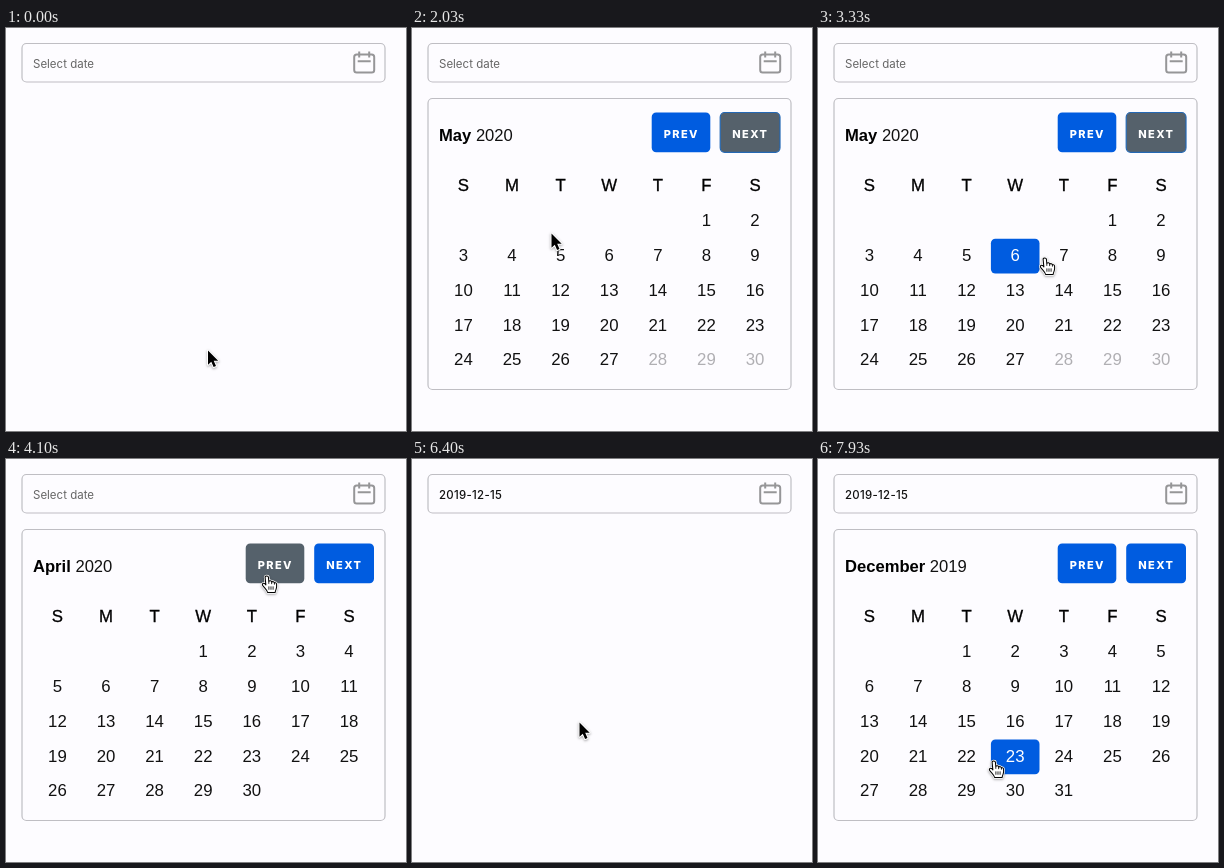
Animation, 400 px wide and 403 px high, one loop 8000 ms. Source, as an HTML page with a canvas:

```html
<!DOCTYPE html>
<html lang="en">
<head>
<meta charset="utf-8">
<title>Date picker</title>
<style>
html, body { margin: 0; width: 100%; height: 100%; overflow: hidden; background: #fdfcff; }
canvas { display: block; width: 400px; height: 403px; }
</style>
</head>
<body>
<canvas id="stage"></canvas>
<script>
const W = 400, H = 403, LOOP = 8000;
const PAGE = '#fdfcff', BLUE = '#005ce0', SLATE = '#55616b', LINE = '#bfbec3', ICON = '#969698';
const SANS = '"Liberation Sans", Arial, sans-serif';
const UI = 'Inter, Roboto, sans-serif';
const GRID = { x: 27.1, y: 176, w: 48.6, h: 34.8, rows: 5 };
const PREV = { x: 239.7, y: 84.5, w: 58.6, h: 39.8 };
const NEXT = { x: 308.2, y: 84.5, w: 59.8, h: 39.8 };
const INPUT = { x: 16, y: 15.5, w: 363, h: 38.5 };
const TODAY = 27;

// Opening, first click on PREV, repeated clicks, picking a day, reopening
const OPEN = 1260, BACK = 3950, REPEAT = 4250, BEAT = 160, PICK = 5850, REOPEN = 7170;
const HOVER_LAG = 20;

const canvas = document.getElementById('stage');
const ctx = canvas.getContext('2d');
const dpr = window.devicePixelRatio || 1;
canvas.width = W * dpr;
canvas.height = H * dpr;

const clamp = (v, lo, hi) => Math.min(hi, Math.max(lo, v));
const isOpen = t => (t >= OPEN && t < PICK) || t >= REOPEN;
const inside = (p, b) => p.x >= b.x && p.x < b.x + b.w && p.y >= b.y && p.y < b.y + b.h;
const cellAt = (col, row) => ({
  x: GRID.x + col * GRID.w, y: GRID.y + row * GRID.h, w: GRID.w, h: GRID.h
});

// The pointer's stops
const stop = (t, x, y) => ({ t, x, y });
const onCell = (t, col, row) => {
  const c = cellAt(col, row);
  return stop(t, c.x + c.w / 2, c.y + c.h / 2);
};
const ROUTE = [
  stop(400, 202, 322.5), stop(1200, 146, 37), stop(2030, 139.5, 205.5),
  onCell(2400, 5, 1), onCell(2860, 0, 1), stop(3330, 227, 230), stop(3480, 314, 208),
  stop(3730, 261, 117), stop(4900, 261, 117),
  onCell(5150, 6, 2), stop(5370, 259.5, 257), onCell(5750, 2, 2),
  stop(6400, 167.5, 263.5), stop(7100, 150, 38), stop(7470, 150, 109),
  onCell(7720, 5, 2), stop(7930, 176, 302), stop(LOOP, 170, 302)
];

// Monotone cubic through the stops, so rests stay still
function slope(i, k) {
  if (i <= 0 || i >= ROUTE.length - 1) return 0;
  const [a, b, c] = ROUTE.slice(i - 1, i + 2);
  const d = (b[k] - a[k]) / (b.t - a.t);
  const e = (c[k] - b[k]) / (c.t - b.t);
  return d * e <= 0 ? 0 : 2 * d * e / (d + e);
}

function pointerAt(time) {
  const t = Math.max(time, ROUTE[0].t);
  const i = Math.max(1, ROUTE.findIndex(s => s.t > t)) - 1;
  const a = ROUTE[i], b = ROUTE[i + 1], span = b.t - a.t;
  const u = (t - a.t) / span, v = 1 - u;
  const at = k => a[k] * (1 + 2 * u) * v * v + b[k] * u * u * (3 - 2 * u)
    + span * u * v * (v * slope(i, k) - u * slope(i + 1, k));
  return { x: at('x'), y: at('y') };
}

// Counts back from May 2020; weekdays always follow 2020 and five rows fit
function monthAt(t) {
  const back = t < BACK ? 0 : clamp(2 + Math.floor((t - REPEAT) / BEAT), 1, 5);
  const m = (16 - back) % 12;
  const first = new Date(2020, m, 1).getDay();
  const days = Math.min(new Date(2020, m + 1, 0).getDate(), GRID.rows * 7 - first);
  const name = new Date(2020, m, 1).toLocaleString('en-US', { month: 'long' });
  return { name, year: back > 4 ? 2019 : 2020, first, days, last: back ? days : TODAY, newest: !back };
}

function dayUnder(p, month) {
  const col = Math.floor((p.x - GRID.x) / GRID.w);
  const row = Math.floor((p.y - GRID.y) / GRID.h);
  if (col < 0 || col > 6 || row < 0 || row >= GRID.rows) return 0;
  const day = row * 7 + col - month.first + 1;
  return day > 0 && day <= month.last ? day : 0;
}

function box(b, fill, stroke, r = 4.5) {
  ctx.beginPath();
  ctx.roundRect(b.x, b.y, b.w, b.h, r);
  ctx.fillStyle = fill;
  ctx.fill();
  if (!stroke) return;
  ctx.strokeStyle = stroke;
  ctx.lineWidth = 1.2;
  ctx.stroke();
}

function text(str, x, y, font, color, align = 'left', spacing = 0) {
  ctx.font = font;
  ctx.fillStyle = color;
  ctx.textAlign = align;
  ctx.letterSpacing = spacing + 'px';
  ctx.fillText(str, x, y);
  return ctx.measureText(str).width;
}

function drawInput(t) {
  box(INPUT, PAGE, LINE);
  if (t < PICK) text('Select date', 27, 39.7, '11.5px ' + UI, '#666');
  else text('2019-12-15', 27, 39.5, '500 11.4px ' + UI, '#111', 'left', 0.3);

  ctx.strokeStyle = ICON;
  ctx.lineWidth = 2;
  ctx.beginPath();
  ctx.roundRect(348.2, 26.4, 20, 18.2, 2.5);
  for (const x of [353.2, 363.2]) { ctx.moveTo(x, 23.4); ctx.lineTo(x, 29.4); }
  ctx.moveTo(351.7, 33.2);
  ctx.lineTo(364.7, 33.2);
  ctx.stroke();
}

function drawButton(label, b, fill, border) {
  box(b, fill, border);
  text(label, b.x + 12, 110, '800 11px ' + UI, '#fff', 'left', 1.4);
}

function drawCalendar(t) {
  const month = monthAt(t);
  const p = pointerAt(t - HOVER_LAG);
  const hot = dayUnder(p, month);
  const size = '16.8px ' + SANS;

  box({ x: 16, y: 70.5, w: 363, h: 291 }, PAGE, LINE);
  const width = text(month.name + ' ', 27, 113, 'bold 16.6px ' + SANS, '#000');
  text(month.year, 27 + width, 113, '16.6px ' + SANS, '#111');
  drawButton('PREV', PREV, inside(p, PREV) ? SLATE : BLUE);
  drawButton('NEXT', NEXT, month.newest || inside(p, NEXT) ? SLATE : BLUE, month.newest && '#2468b4');

  ctx.strokeStyle = '#000';
  ctx.lineWidth = 0.3;
  [...'SMTWTFS'].forEach((d, col) => {
    const x = cellAt(col + 0.5, 0).x;
    text(d, x, 163, size, '#000', 'center');
    ctx.strokeText(d, x, 163);
  });
  for (let day = 1; day <= month.days; day++) {
    const n = day + month.first - 1;
    const c = cellAt(n % 7, Math.floor(n / 7));
    if (day === hot) box(c, BLUE);
    const color = day === hot ? '#fff' : day > month.last ? '#b0afb3' : '#111';
    text(day, c.x + c.w / 2, c.y + 22.2, size, color, 'center');
  }
}

const ARROW = new Path2D('M0 0V14.2L3.3 11.2L5.6 16.6L8 15.6L5.7 10.3H10.2Z');
const HAND = new Path2D('M-2 1.2C-2-.5 1.4-.5 1.5 1.2L1.9 5.6C3 4.4 4.6 4.8 4.9 6.2' +
  'C6 5.3 7.5 5.7 7.8 7C9 6.5 10 7 10.1 8.4V11C10 13.5 8.8 14.5 8.6 16.8H.6' +
  'C.2 14.5-2.2 12.8-4.6 9.6C-5.6 8-3.7 6.6-2.2 7.9L-1.2 9Z');
const FINGERS = new Path2D('M1.9 5.6V8M4.9 6.2V8.3M7.8 7V8.8M2 10.6V14M4.2 10.6V14M6.4 10.6V14');

function drawPointer(t) {
  const p = pointerAt(t);
  const hand = inside(p, INPUT) ||
    (isOpen(t) && (inside(p, PREV) || inside(p, NEXT) || dayUnder(p, monthAt(t))));
  const shape = hand ? HAND : ARROW;
  ctx.save();
  ctx.translate(p.x, p.y);
  if (hand) ctx.scale(0.95, 0.98);
  ctx.lineJoin = 'round';
  ctx.shadowColor = 'rgba(0,0,0,.35)';
  ctx.shadowBlur = 2.5 * dpr;
  ctx.shadowOffsetY = dpr;
  ctx.strokeStyle = '#fff';
  ctx.lineWidth = hand ? 2.6 : 2;
  ctx.stroke(shape);
  ctx.shadowColor = 'transparent';
  ctx.fillStyle = hand ? '#fff' : '#000';
  ctx.fill(shape);
  if (hand) {
    ctx.strokeStyle = '#000';
    ctx.lineWidth = 1.1;
    ctx.stroke(shape);
    ctx.lineWidth = 0.9;
    ctx.stroke(FINGERS);
  }
  ctx.restore();
}

function draw(now) {
  const t = now % LOOP;
  ctx.setTransform(dpr, 0, 0, dpr, 0, 0);
  ctx.fillStyle = PAGE;
  ctx.fillRect(0, 0, W, H);
  drawInput(t);
  if (isOpen(t)) drawCalendar(t);
  drawPointer(t);
}

let start;
function tick(now) {
  start ??= now;
  draw(now - start);
  requestAnimationFrame(tick);
}
draw(0);
requestAnimationFrame(tick);
</script>
</body>
</html>
```
